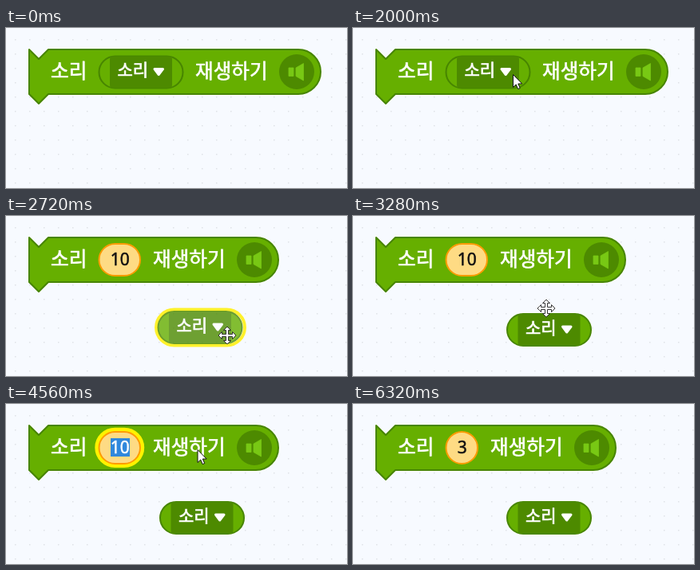
Recreate the animation shown at these times as an HTML page. Size 427 by 201 pixels, loop 6880 ms.

```html
<!DOCTYPE html>
<html lang="ko">
<head>
<meta charset="utf-8">
<title>소리 재생하기</title>
<style>
  html, body { margin: 0; width: 100%; height: 100%; overflow: hidden; background: #f7faff; }
  svg { display: block; width: 427px; height: 201px; }
  text { font-family: "Noto Sans CJK KR", "Noto Sans CJK", "Noto Sans", sans-serif; }
  .label, .small { fill: #fff; stroke: #fff; stroke-width: .7; }
  .label { font-size: 24.6px; }
  .small { font-size: 21px; }
  .number { font-family: "Noto Sans", sans-serif; font-size: 21px; text-anchor: middle; stroke-width: .5; }
  .green { fill: #66af00; stroke: #478500; stroke-width: 2; }
  .dark { fill: #4d8a00; }
</style>
</head>
<body>
<svg viewBox="0 0 427 201">
  <defs>
    <pattern id="dots" x="11" y="14" width="18" height="18" patternUnits="userSpaceOnUse">
      <rect width="1.5" height="1.5" fill="#dfe2e7"/>
    </pattern>
  </defs>
  <rect width="427" height="201" fill="#f7faff"/>
  <rect width="427" height="201" fill="url(#dots)"/>

  <path id="block" class="green" stroke-linejoin="round"/>
  <text class="label" x="56" y="62.5">소리</text>
  <g id="tail">
    <text class="label" x="15" y="62.5">재생하기</text>
    <circle class="dark" cx="142" cy="55" r="22"/>
    <path fill="#78c814" d="M132 50h6v10.500h-6zM141 50L150.500 44.500V66L141 60.500z"
      stroke="#78c814" stroke-width=".8" stroke-linejoin="round"/>
  </g>

  <g id="input">
    <rect id="ring" fill="none" stroke="#fff200" stroke-width="5" y="32.200" height="45.200"/>
    <rect id="field" fill="#fedb84" stroke="#ff9b00" stroke-width="2" y="35" height="40" rx="20"/>
    <rect id="selection" fill="#3088dc" x="131" y="43" width="24" height="23"/>
    <text id="value" class="number" y="62"></text>
  </g>

  <g id="menu">
    <rect id="halo" fill="none" stroke="#fff12b" stroke-width="4" x="114" y="33" width="111" height="45" rx="22.500"/>
    <g id="pill">
      <rect class="green" x="116.500" y="35.500" width="105" height="40" rx="20"/>
      <rect class="dark" x="130" y="35.500" width="78" height="40" rx="4"/>
      <text class="small" x="139.500" y="60.300">소리</text>
      <path fill="#fff" stroke="#fff" stroke-width="3" stroke-linejoin="round" d="M186 51.500H196.500L191.200 58.500z"/>
    </g>
  </g>

  <g id="move" fill="#fff" stroke="#222" stroke-width=".9">
    <path d="M0-11L4.500-6.500H1.500V-1.500H6.500V-4.500L11 0L6.500 4.500V1.500H1.500V6.500H4.500L0 11L-4.500 6.500H-1.500V1.500H-6.500V4.500L-11 0L-6.500-4.500V-1.500H-1.500V-6.500H-4.500z"/>
  </g>
  <g id="arrow" fill="#fff" stroke="#111">
    <path d="M.5.5V16.500L4.200 13L6.600 18.600L9.200 17.500L6.800 12H11.700z"/>
  </g>
  <g id="beam" fill="none" stroke="#111">
    <path d="M-3-8H-1L0-7L1-8H3M0-7V7M-3 8H-1L0 7L1 8H3"/>
  </g>
</svg>
<script>
const LOOP = 6880, STEP = 80;
const $ = id => document.getElementById(id);
const set = (id, attrs) => {
  for (const key in attrs) $(id).setAttribute(key, attrs[key]);
};
const show = (id, on) => set(id, { visibility: on ? 'visible' : 'hidden' });

// time, x, y, pointer shape until the next entry
const path = [
  [1040, 402, 166, 'move'],
  [1680, 244, 86, 'move'],
  [1760, 228, 77, 'arrow'],
  [2000, 200, 58, 'arrow'],
  [2160, 200, 58, 'arrow'],
  [2240, 203, 65.5, 'move'],
  [2720, 277, 150, 'move'],
  [2800, 279.5, 153, 'move'],
  [2960, 279.5, 153, 'move'],
  [3040, 278, 150, 'arrow'],
  [3200, 255, 128, 'arrow'],
  [3280, 242, 116, 'move'],
  [3440, 205, 90, 'move'],
  [3520, 188, 78, 'arrow'],
  [3680, 155, 58, 'beam'],
  [3920, 151, 52, 'beam'],
  [4080, 151, 52, 'beam'],
  [4160, 163, 52, 'beam'],
  [4400, 163, 52, 'beam'],
  [4480, 180, 54, 'arrow'],
  [4800, 418, 66, 'arrow'],
  [4880, 440, 68, '']
];
const GRAB = [203, 65.5], REST = { x: 279.5, y: 153 };
const DRAG = 2240, DROP = 2880, TYPED = 4880;

function pointer(t) {
  const i = path.findLastIndex(p => p[0] <= t);
  if (i < 0 || i === path.length - 1) return { kind: '', x: 0, y: 0 };
  const [t0, x0, y0, kind] = path[i], [t1, x1, y1] = path[i + 1];
  const k = (t - t0) / (t1 - t0);
  return { kind, x: x0 + (x1 - x0) * k, y: y0 + (y1 - y0) * k };
}

function glow(t) {
  if (t < 3760 || t >= 6320) return 0;
  if (t < 3840) return 0.6;
  if (t < 6160) return 1;
  return t < 6240 ? 0.6 : 0.25;
}

function draw(t) {
  const p = pointer(t);
  const out = t >= DRAG, held = out && t < DROP;
  const typed = t >= TYPED;
  const slotEnd = !out ? 222 : typed ? 157 : 169;
  const end = slotEnd + 144;

  set('block', {
    d: `M29 27L41 39L53 27H${end}A28 28 0 0 1 ${end} 83H53L41 95L29 83z`
  });
  set('tail', { transform: `translate(${slotEnd})` });

  show('input', out);
  const width = slotEnd - 117.5;
  set('field', { x: 116.5, width });
  set('ring', { x: 113.8, width: width + 5.4, rx: 22.6, opacity: glow(t) });
  const selected = t >= 3840 && !typed;
  const ink = selected ? '#fff' : '#111';
  set('selection', { opacity: +selected });
  set('value', { x: 117 + width / 2, fill: ink, stroke: ink });
  $('value').textContent = typed ? '3' : '10';

  const at = t < DROP ? p : REST;
  const dx = out ? at.x - GRAB[0] : 0, dy = out ? at.y - GRAB[1] : 0;
  set('menu', { transform: `translate(${dx} ${dy})` });
  set('halo', { opacity: +held });
  set('pill', { opacity: held ? 0.8 : 1 });

  for (const id of ['move', 'arrow', 'beam']) {
    show(id, p.kind === id);
    set(id, { transform: `translate(${p.x} ${p.y})` });
  }
}

const start = performance.now();
function tick() {
  const t = (performance.now() - start) % LOOP;
  draw(Math.floor(t / STEP) * STEP);
  requestAnimationFrame(tick);
}
tick();
</script>
</body>
</html>
```
